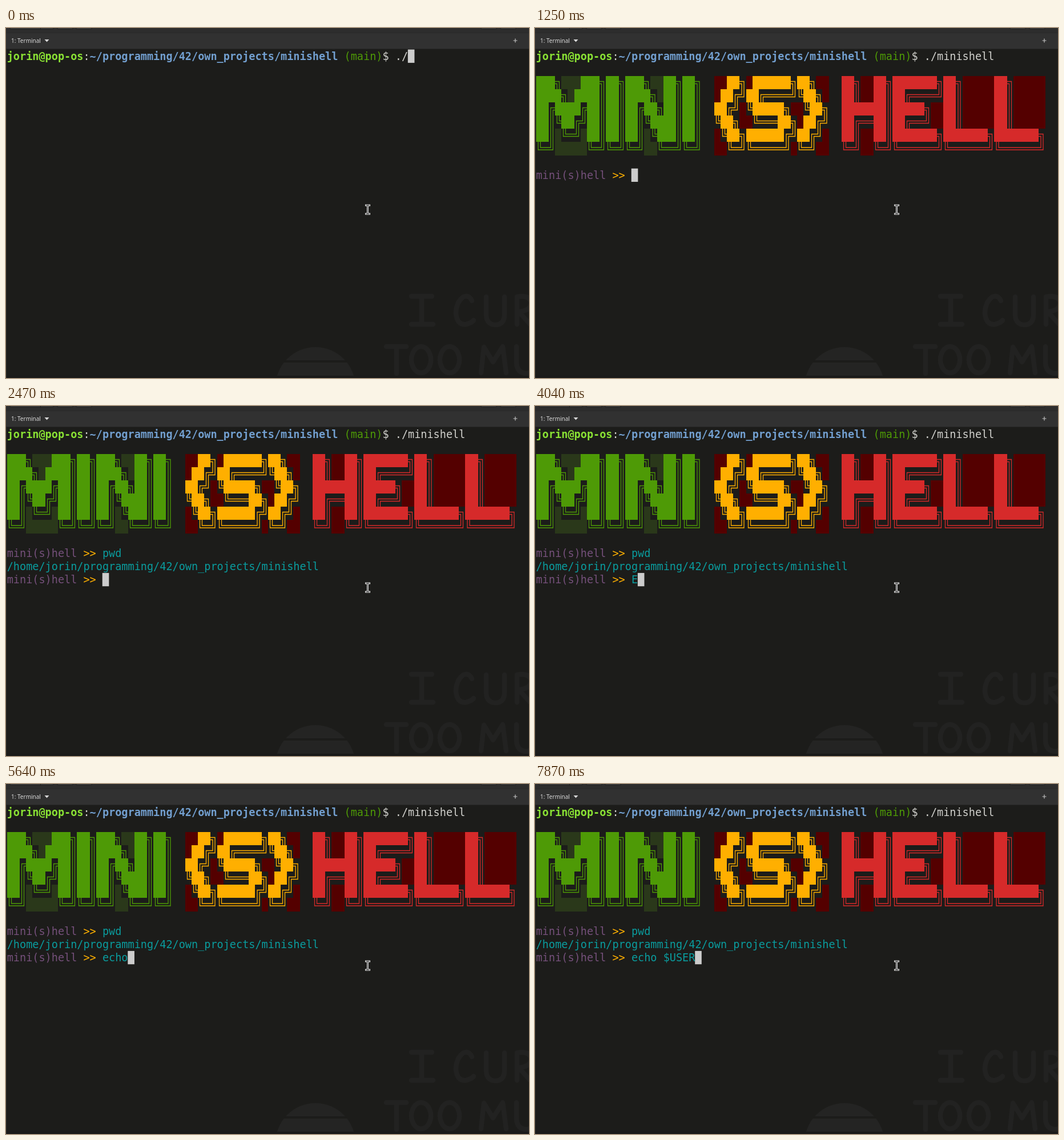
An HTML page with a canvas for the animation above (8000 ms loop, 916 by 612 pixels).

```html
<!DOCTYPE html>
<html lang="en">
<head>
<meta charset="utf-8">
<title>minishell</title>
<style>
html, body { margin: 0; width: 100%; height: 100%; overflow: hidden; background: #1c1c1a; }
canvas { display: block; }
</style>
</head>
<body>
<canvas id="stage" width="916" height="612"></canvas>
<script>
const ctx = document.getElementById('stage').getContext('2d');
const LOOP = 8000;
const LEFT = 1.7, TOP = 37.6, CELL_W = 11.148, CELL_H = 23.12;
const BG = '#1c1c1a', WHITE = '#d0d0cc', CYAN = '#0a9c9e', ORANGE = '#ffaf00';
const GREEN = '#4e9a06', PURPLE = '#75507b', RED = '#d62a2a', DARK_RED = '#540000';

const colX = col => LEFT + col * CELL_W;
const rowY = row => TOP + row * CELL_H;

// Typed text by start time
const COMMAND = [[0, './'], [230, './m'], [400, './mi'], [570, './min'], [740, './mini'], [850, './minishell']];
const FIRST = [[1250, ''], [1900, 'p'], [2010, 'pw'], [2240, 'pwd']];
const SECOND = [[2470, ''], [4040, 'E'], [5010, ''], [5170, 'e'], [5380, 'ec'], [5480, 'ech'], [5640, 'echo'],
  [5910, 'echo '], [6240, 'echo $'], [7220, 'echo $U'], [7330, 'echo $US'], [7610, 'echo $USE'], [7870, 'echo $USER']];

// Spaces inside the words are filled with the shade colour
const BANNER = [
  { col: 0, color: GREEN, shade: '#2a381a', rows: [
    '███╗   ███╗██╗███╗  ██╗██╗',
    '████╗ ████║██║████╗ ██║██║',
    '██╔████╔██║██║██╔██╗██║██║',
    '██║╚██╔╝██║██║██║╚████║██║',
    '██║ ╚═╝ ██║██║██║ ╚███║██║',
    '╚═╝     ╚═╝╚═╝╚═╝  ╚══╝╚═╝'] },
  { col: 28, color: ORANGE, shade: DARK_RED, rows: [
    '  ██╗ ██████╗██╗  ',
    ' ██╔╝██╔════╝╚██╗ ',
    '██╔╝ ╚█████╗  ╚██╗',
    '╚██╗  ╚═══██╗ ██╔╝',
    ' ╚██╗██████╔╝██╔╝ ',
    '  ╚═╝╚═════╝ ╚═╝  '] },
  { col: 48, color: RED, shade: DARK_RED, rows: [
    '██╗  ██╗███████╗██╗     ██╗     ',
    '██║  ██║██╔════╝██║     ██║     ',
    '███████║█████╗  ██║     ██║     ',
    '██╔══██║██╔══╝  ██║     ██║     ',
    '██║  ██║███████╗███████╗███████╗',
    '╚═╝  ╚═╝╚══════╝╚══════╝╚══════╝'] }
];
const CORNERS = { '╔': [1, 1], '╗': [-1, 1], '╚': [1, -1], '╝': [-1, -1] };

function rect(color, x, y, w, h) {
  ctx.fillStyle = color;
  ctx.fillRect(x, y, w, h);
}

function strokePath(d, color, width) {
  ctx.strokeStyle = color;
  ctx.lineWidth = width;
  ctx.stroke(new Path2D(d));
}

// Writes text on the grid and returns the next column
function write(text, col, row, color, weight = 400) {
  ctx.font = `${weight} 18.52px "DejaVu Sans Mono", monospace`;
  ctx.fillStyle = color;
  ctx.fillText(text, colX(col), rowY(row) + 18);
  return col + text.length;
}

function drawCursor(col, row) {
  rect('#cccccc', colX(col) - .2, rowY(row), 11.6, 23.3);
}

function drawGlyph(char, col, row, color, shade) {
  const x = Math.round(colX(col)), y = Math.round(rowY(row));
  const w = Math.round(colX(col + 1)) - x, h = Math.round(rowY(row + 1)) - y;
  if (char === '█' || char === ' ') return rect(char === ' ' ? shade : color, x, y, w, h);
  const cx = x + w / 2, cy = y + h / 2, gap = 2;
  ctx.strokeStyle = color;
  ctx.lineWidth = 1.3;
  ctx.beginPath();
  for (const side of [-gap, gap]) {
    if (char === '║') {
      ctx.moveTo(cx + side, y);
      ctx.lineTo(cx + side, y + h);
    } else if (char === '═') {
      ctx.moveTo(x, cy + side);
      ctx.lineTo(x + w, cy + side);
    } else {
      const [dx, dy] = CORNERS[char];
      ctx.moveTo(cx + dx * w / 2, cy - side * dy);
      ctx.lineTo(cx - side * dx, cy - side * dy);
      ctx.lineTo(cx - side * dx, cy + dy * h / 2);
    }
  }
  ctx.stroke();
}

function drawBanner() {
  for (const { col, color, shade, rows } of BANNER)
    rows.forEach((line, r) => [...line].forEach((char, c) => drawGlyph(char, col + c, r + 2, color, shade)));
}

function drawWallpaper() {
  ctx.lineCap = ctx.lineJoin = 'round';
  strokePath('M710 469H746M728 469V517M710 518H748' +
    'M816 477Q811 466 801 470Q788 480 788 499Q790 520 806 518Q815 516 819 511' +
    'M841 470V500Q841 519 858 519Q874 518 873 498V470' +
    'M895 518V470Q917 466 920 480Q920 494 898 496L918 518' +
    'M666 557H701M684 557V604' +
    'M727 557a17 23 0 1 0 .1 0M777 557a17 23 0 1 0 .1 0' +
    'M832 603L837 558L853 584L870 557L876 603' +
    'M894 557V585Q895 604 912 604Q922 603 924 590', '#222221', 8.5);
  ctx.lineCap = 'butt';
  ctx.lineJoin = 'miter';
  ctx.fillStyle = '#242423';
  ctx.beginPath();
  ctx.arc(542, 628, 70, 0, 7);
  ctx.fill();
  rect(BG, 484, 581, 116, 4);
  rect('#1a1a19', 0, 608, 916, 4);
}

function drawWindow() {
  rect('#2d2d2d', 0, 0, 916, 9);
  for (const [x, w] of [[6, 77], [89, 28], [122, 28], [831, 28], [865, 28]]) {
    ctx.fillStyle = '#373737';
    ctx.strokeStyle = '#202020';
    ctx.lineWidth = 1;
    ctx.beginPath();
    ctx.roundRect(x + .5, -10, w, 12.5, 3);
    ctx.fill();
    ctx.stroke();
  }
  rect('#202020', 60, 0, 1, 2);
  rect('#292929', 0, 8, 916, 1);
  rect('#313131', 0, 9, 916, 27);
  rect('#272727', 0, 36, 916, 1);
  rect('#2b2b27', 0, 37, 1, 575);
  ctx.font = '10px "Noto Sans", sans-serif';
  ctx.fillStyle = '#d8d8d8';
  ctx.fillText('1: Terminal', 9, 25.5);
  ctx.fill(new Path2D('M67.5 20H75.5L71.5 24.5Z'));
  strokePath('M888.5 22H895.5M892 18.5V25.5', '#c4c4c4', 1.2);
}

function drawPointer() {
  const beam = 'M630.5 310H636.5M633.5 310V325M630.5 325H636.5';
  ctx.lineCap = 'square';
  strokePath(beam, '#f2f2f2', 3);
  strokePath(beam, '#1c1c1c', 1);
  ctx.lineCap = 'butt';
}

// Draws a typed line once it has begun; shows the cursor until the line ends
function drawTyping(steps, end, time, col, row, color) {
  const step = steps.findLast(([start]) => start <= time);
  const next = write(step[1], col, row, color);
  if (time < end) drawCursor(next, row);
}

function drawPrompt(steps, end, time, row) {
  write('mini(s)hell', 0, row, PURPLE);
  write('>>', 12, row, ORANGE);
  drawTyping(steps, end, time, 15, row, CYAN);
}

function draw(time) {
  rect(BG, 0, 0, 916, 612);
  drawWallpaper();
  drawWindow();

  let col = write('jorin@pop-os', 0, 0, '#8ae234', 700);
  col = write(':', col, 0, WHITE);
  col = write('~/programming/42/own_projects/minishell', col, 0, '#729fcf', 700);
  col = write('(main)', col + 1, 0, GREEN);
  col = write('$ ', col, 0, WHITE);
  drawTyping(COMMAND, 1250, time, col, 0, WHITE);

  if (time >= 1250) {
    drawBanner();
    drawPrompt(FIRST, 2470, time, 9);
  }
  if (time >= 2470) {
    write('/home/jorin/programming/42/own_projects/minishell', 0, 10, CYAN);
    drawPrompt(SECOND, LOOP, time, 11);
  }
  drawPointer();
}

const origin = performance.now();
function tick() {
  draw((performance.now() - origin) % LOOP);
  requestAnimationFrame(tick);
}
tick();
</script>
</body>
</html>
```
